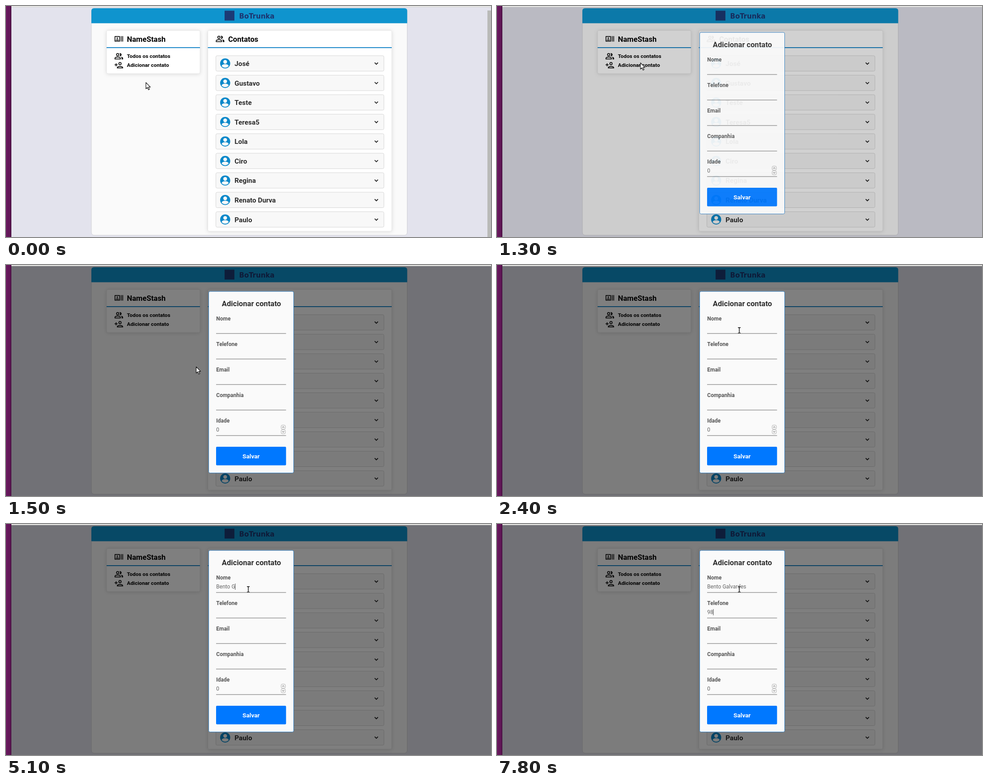
These frames come from a looping animation (1085 px wide and 516 px high, 8000 ms). An HTML page:

```html
<!DOCTYPE html>
<html lang="pt">
<head>
<meta charset="utf-8">
<title>Contatos</title>
<style>
  html, body { margin: 0; width: 100%; height: 100%; overflow: hidden; background: #e3e3ed; }
  svg { display: block; width: 100%; height: 100%; }
  text { font-family: Roboto, sans-serif; white-space: pre; }
  .bold { font-weight: 700; }
  .input { font-size: 12px; fill: #666; }
</style>
</head>
<body>
<svg id="stage" viewBox="0 0 1085 516"></svg>
<script>
const LOOP = 8000, STEP = 100;
const contacts = ['José', 'Gustavo', 'Teste', 'Teresa5', 'Lola', 'Ciro', 'Regina', 'Renato Durva', 'Paulo'];
const labels = ['Nome', 'Telefone', 'Email', 'Companhia', 'Idade'];
const NAME = 'Bento Galvardes', PHONE = '98';

// [time, value...] keys
const nameKeys = [[0, 0], [3100, 1], [3300, 2], [3400, 3], [3500, 5], [3700, 6], [5100, 7], [5300, 8],
  [5500, 9], [5700, 10], [5800, 11], [6000, 12], [6100, 13], [6200, 15]];
const phoneKeys = [[0, 0], [7600, 1], [7800, 2]];
const pointerKeys = [[0, 313, 171], [400, 313, 171], [700, 317, 148], [1000, 321, 127], [1300, 321, 127],
  [1400, 368, 183], [1500, 425.5, 227.5], [1700, 485, 208], [1900, 530, 165], [2100, 544, 147],
  [2200, 544, 147], [2400, 542, 146]];
const formKeys = [[1100, 0], [1200, .17], [1300, .93], [1400, 1]];
const shadeKeys = [[1100, 0], [1200, .025], [1300, .18], [1400, .38], [1500, .5]];

const rect = (x, y, w, h, fill, more = '') =>
  `<rect x="${x}" y="${y}" width="${w}" height="${h}" fill="${fill}" ${more}/>`;
const text = (x, y, size, str, fill = '#000', more = 'class="bold"') =>
  `<text x="${x}" y="${y}" font-size="${size}" fill="${fill}" ${more}>${str}</text>`;
const icon = (x, y, d) =>
  `<path transform="translate(${x} ${y}) scale(.87)" d="${d}" fill="#111" fill-rule="evenodd"/>`;

const head = x => `M${x} 4a4 4 0 1 1 0 8a4 4 0 1 1 0-8zm0 2a2 2 0 1 0 0 4a2 2 0 1 0 0-4z`;
const peopleIcon = head(9) +
  'M9 13c-2.67 0-8 1.34-8 4v3h16v-3c0-2.66-5.33-4-8-4zm6 5H3v-1c.2-.7 3.3-2 6-2s5.800 1.300 6 2z' +
  'M16.670 13.130c1.370.930 2.330 2.200 2.330 3.870v3h4v-3c0-2.180-3.570-3.470-6.330-3.870z' +
  'M15 12a4 4 0 1 0-1.330-7.760a6 6 0 0 1 0 7.520c.4.140.860.240 1.330.240z';
const addIcon = head(15) +
  'M15 14c-2.670 0-8 1.340-8 4v2h16v-2c0-2.660-5.330-4-8-4zm6 4H9c.2-.7 3.300-2 6-2s5.800 1.300 6 2z' +
  'M6 15v-3h3v-2H6V7H4v3H1v2h3v3z';
const cardIcon = 'M21 5h2v14h-2zM17 5h2v14h-2zM2 5h12q1 0 1 1v12q0 1-1 1h-12q-1 0-1-1v-12q0-1 1-1z' +
  'M3 7v10h10v-10zM8 8.200a2 2 0 1 1 0 4a2 2 0 1 1 0-4zM4 15.800q.3-2.300 4-2.500q3.700.2 4 2.500z';

function panel(x, w, h, title, titleX, glyph) {
  return rect(x, 54.5, w, h, '#fff', 'rx="3" stroke="#dcdcdc" stroke-width=".7" filter="url(#soft)"') +
    rect(x, 92, w, 2, '#1b87c9') + icon(x + 17, 63, glyph) + text(titleX, 79.6, 16.6, title);
}

function contactRow(name, i) {
  return `<g transform="translate(0 ${i * 43.57})">
    ${rect(469.5, 111, 376, 34.5, '#f8f8f8', 'rx="3" stroke="#d6d6d6"')}
    <circle cx="490.300" cy="128.300" r="11.300" fill="#0b88ca"/>
    <circle cx="490.300" cy="124.800" r="4.200" fill="#f8f8f8"/>
    <path d="M482.500 134q1-4 7.800-4t7.800 4q-3 3.800-7.800 3.800t-7.800-3.800z" fill="#f8f8f8"/>
    ${text(511.3, 134, 15.3, name, '#2b2b2b')}
    <path d="M824.800 126.500l3.700 3.700 3.700-3.700" fill="none" stroke="#222" stroke-width="1.800"/>
  </g>`;
}

function field(label, i) {
  const y = i * 57;
  return text(470.3, 124.2 + y, 12, label, '#555') + rect(470, 152.500 + y, 156.500, 1, '#666');
}

const spinner = (y, d) => rect(615.5, y, 9.5, 9, '#f6f6f6', 'rx="2.500" stroke="#aaa" stroke-width=".9"') +
  `<path d="M618 ${y + 4.5 + d}l2.200 ${-2 * d} 2.200 ${2 * d}" fill="none" stroke="#444"/>`;

const beam = 'M-3 -6.200h2l1 .8 1-.8h2M0-5.500V5.500M-3 6.200h2l1-.8 1 .8h2';

const stage = document.getElementById('stage');
stage.innerHTML = `
  <defs>
    <filter id="soft" x="-15%" y="-15%" width="130%" height="130%">
      <feDropShadow dx="0" dy="1" stdDeviation="4" flood-color="#000" flood-opacity=".13"/>
    </filter>
    <linearGradient id="edge"><stop stop-color="#6a1a5f"/><stop offset=".75" stop-color="#601656"/>
      <stop offset="1" stop-color="#43103c"/></linearGradient>
  </defs>
  ${rect(0, 0, 1085, 516, '#e3e3ed')}
  ${rect(191, 5, 706.5, 507, '#fafafa', 'rx="6" stroke="#cfcfd4"')}
  <path d="M191 38.500V11q0-6 6-6H891.500q6 0 6 6V38.500z" fill="#0f94ce"/>
  ${rect(489, 10.5, 22, 22, '#1c3a75')}
  ${text(521.5, 27.5, 15, 'BoTrunka', '#1c3570', 'style="font-family:\'DejaVu Sans\',sans-serif;font-weight:700"')}
  ${panel(225, 209, 96.5, 'NameStash', 270.5, cardIcon)}
  ${icon(242, 101.8, peopleIcon)}${text(270.5, 116.4, 11.8, 'Todos os contatos')}
  ${icon(242, 121.8, addIcon)}${text(270.5, 136.4, 11.8, 'Adicionar contato')}
  ${panel(451.5, 411.5, 448.5, 'Contatos', 497, peopleIcon)}
  ${contacts.map(contactRow).join('')}
  ${rect(1077, 10, 8, 506, '#b9bab8', 'id="bar"')}
  ${rect(12, 2, 1073, 514, '#000', 'id="shade"')}
  ${rect(0, 0, 1085, 2, '#efefed')}
  ${rect(12, 1.5, 1073, 1, '#cfcfcc')}
  ${rect(0, 0, 12, 516, 'url(#edge)')}
  <g id="form">
    ${rect(453.5, 59, 190, 405.5, '#fafafa', 'rx="3" stroke="#2f7fc4"')}
    ${text(549, 92, 16.6, 'Adicionar contato', '#2d2d2d', 'class="bold" text-anchor="middle"')}
    ${labels.map(field).join('')}
    <text id="name" class="input" x="470.300" y="144.300"></text>
    <text id="phone" class="input" x="470.300" y="201.300"></text>
    <text class="input" x="470.300" y="372.300">0</text>
    ${spinner(357.7, 1)}${spinner(368, -1)}
    ${rect(470, 406, 156.5, 41.5, '#0078ff', 'rx="2"')}
    ${text(548.3, 431.6, 13.7, 'Salvar', '#fff', 'class="bold" text-anchor="middle"')}
    ${rect(0, 0, 1, 14, '#444', 'id="caret"')}
  </g>
  <path id="arrow" d="M0 0V14L3.300 11 5.700 16.300 8 15.300 5.700 10.200H10z"
    fill="#fff" stroke="#111" stroke-width="1.200" stroke-linejoin="round"/>
  <g id="beam" fill="none">
    <path d="${beam}" stroke="#fff" stroke-width="3"/>
    <path d="${beam}" stroke="#111" stroke-width="1.500"/>
  </g>`;

const $ = id => document.getElementById(id);
const show = (el, on) => el.setAttribute('visibility', on ? 'visible' : 'hidden');
const move = (el, x, y) => el.setAttribute('transform', `translate(${x} ${y})`);

const held = (keys, t) => keys.filter(k => k[0] <= t).pop()[1];
function tween(keys, t) {
  const next = keys.findIndex(k => k[0] > t);
  if (next === 0) return keys[0].slice(1);
  if (next < 0) return keys[keys.length - 1].slice(1);
  const a = keys[next - 1], b = keys[next], p = (t - a[0]) / (b[0] - a[0]);
  return a.slice(1).map((v, i) => v + (b[i + 1] - v) * p);
}

function render(t) {
  $('form').setAttribute('opacity', tween(formKeys, t)[0]);
  $('shade').setAttribute('opacity', tween(shadeKeys, t)[0]);
  show($('bar'), t < 1300);

  $('name').textContent = NAME.slice(0, held(nameKeys, t));
  $('phone').textContent = PHONE.slice(0, held(phoneKeys, t));
  const onPhone = t >= 6400, active = onPhone ? $('phone') : $('name');
  move($('caret'), 470 + active.getComputedTextLength(), onPhone ? 190 : 133);
  show($('caret'), t >= 3000 && (t < 4500 || t >= 5100));

  const [x, y] = tween(pointerKeys, t), overInput = t >= 2000;
  show($('arrow'), !overInput);
  show($('beam'), overInput);
  move($('arrow'), x, y);
  move($('beam'), x, y);
}

const start = performance.now();
function tick() {
  const t = (performance.now() - start) % LOOP;
  render(Math.floor(t / STEP) * STEP);
  requestAnimationFrame(tick);
}
tick();
</script>
</body>
</html>
```
